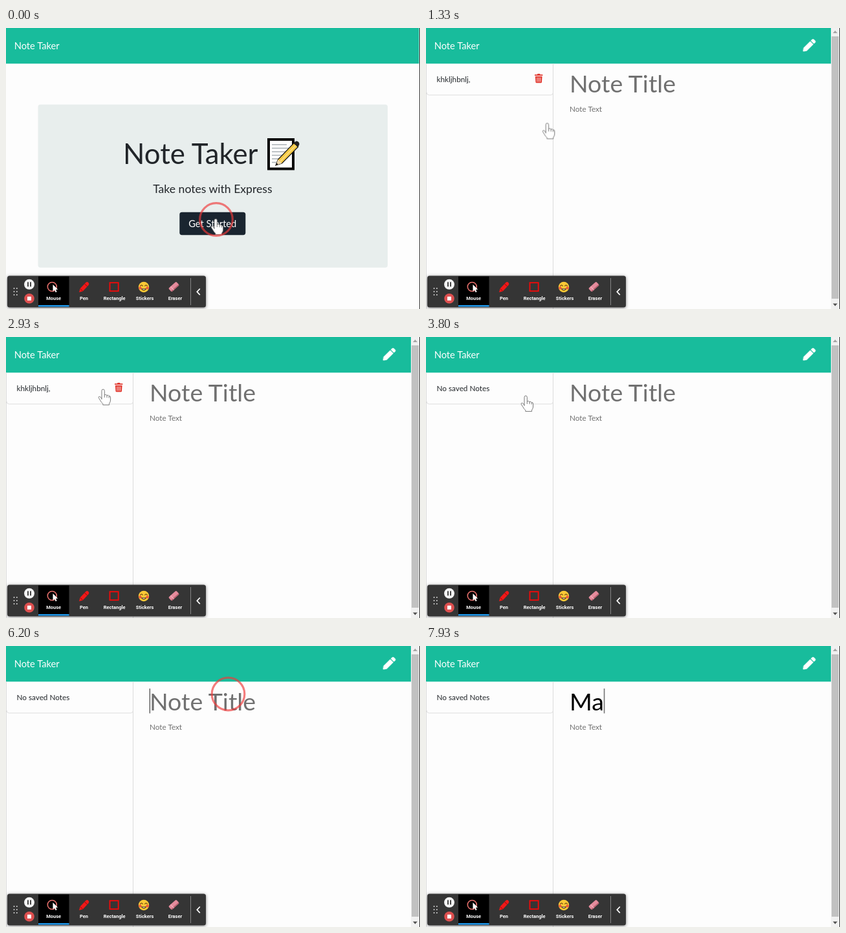
These frames come from a looping animation (640x436 px, 8 s). An HTML page:

```html
<!DOCTYPE html>
<html lang="en">
<head>
<meta charset="utf-8">
<title>Note Taker</title>
<style>
html, body { margin: 0; width: 100%; height: 100%; overflow: hidden; background: #fdfdfd; }
svg { display: block; width: 640px; height: 436px; font-family: Lato, sans-serif; }
.mid { text-anchor: middle; }
.brand, .btn { font-size: 14.7px; fill: #fff; }
.small { font-size: 11.75px; fill: #212529; }
.title { font-size: 37.6px; }
.hint { fill: #707070; }
.tool { font: 700 7.5px Roboto, sans-serif; fill: #fff; text-anchor: middle; }

/* hard switches */
.landing, .notes, .icons, .trash, .saved, .empty, .hand, .arrow, .caret, .ph, .m, .a {
  animation: 8s step-end infinite;
}
.landing { animation-name: landing; }
.notes { animation-name: notes; }
.icons { animation-name: icons; }
.trash, .saved { animation-name: saved; }
.empty { animation-name: empty; }
.hand { animation-name: hand; }
.arrow { animation-name: arrow; }
.caret { animation-name: caret; }
.ph { animation-name: ph; }
.m { animation-name: m; }
.a { animation-name: a; }
@keyframes landing { 0% { opacity: 1 } 5%, 100% { opacity: 0 } }
@keyframes notes { 0% { opacity: 0 } 5%, 100% { opacity: 1 } }
@keyframes icons { 0% { opacity: 0 } 11.6%, 100% { opacity: 1 } }
@keyframes saved { 0% { opacity: 1 } 43.2%, 100% { opacity: 0 } }
@keyframes empty { 0% { opacity: 0 } 43.2%, 100% { opacity: 1 } }
@keyframes hand {
  0% { opacity: 1 } 11.6% { opacity: 0 } 16.6% { opacity: 1 }
  50.6% { opacity: 0 } 62.4% { opacity: 1 } 74% { opacity: 0 } 100% { opacity: 0 }
}
@keyframes arrow {
  0% { opacity: 0 } 11.6% { opacity: 1 } 16.6% { opacity: 0 }
  50.6% { opacity: 1 } 62.4% { opacity: 0 } 74% { opacity: 1 } 74.9%, 100% { opacity: 0 }
}
@keyframes caret {
  0% { opacity: 0; transform: none }
  77.4% { opacity: 1; transform: none }
  84.1% { opacity: 0; transform: none }
  90.7% { opacity: 1; transform: none }
  97.4% { opacity: 0; transform: none }
  98.2% { opacity: 1; transform: translateX(34.5px) }
  99.1%, 100% { opacity: 1; transform: translateX(53.3px) }
}
@keyframes ph { 0% { opacity: 1 } 98.2%, 100% { opacity: 0 } }
@keyframes m { 0% { opacity: 0 } 98.2%, 100% { opacity: 1 } }
@keyframes a { 0% { opacity: 0 } 99.1%, 100% { opacity: 1 } }

/* pointer path */
.pointer { animation: move 8s linear infinite; }
@keyframes move {
  0%, 10.9% { transform: translate(324px, 297px) }
  18.2%, 19.4% { transform: translate(150px, 108px) }
  23.2%, 33.4% { transform: translate(102px, 88px) }
  38.2%, 46.7% { transform: translate(173px, 79px) }
  47.5%, 47.9% { transform: translate(154px, 92px) }
  48.2%, 49.4% { transform: translate(151px, 97px) }
  54.1%, 55.9% { transform: translate(370px, 46px) }
  59.9%, 61.5% { transform: translate(561px, 33px) }
  63.2%, 73.4% { transform: translate(591px, 31px) }
  75%, 100% { transform: translate(343px, 74px) }
}

/* click ripples: the same fade, started at --at */
.ring {
  fill: none; stroke: #f03a3a; stroke-width: 3.2; opacity: 0;
  animation: ring 8s linear infinite; animation-delay: calc(var(--at) - 8s);
}
@keyframes ring { 0%, .75% { opacity: .66 } 3.2%, 100% { opacity: 0 } }
</style>
</head>
<body>
<svg viewBox="0 0 640 436">
  <defs>
    <filter id="shadow" x="-10%" y="-30%" width="120%" height="160%">
      <feDropShadow dx="0" dy="1" stdDeviation="2.5" flood-opacity=".5"/>
    </filter>
    <path id="cursor" d="M0 0V17.2L4.1 13.5 6.8 19.6 9.8 18.3 7.1 12.3H12.4Z"/>
  </defs>
  <rect width="640" height="436" fill="#fdfdfd"/>
  <rect width="638.5" height="55.3" fill="#18bc9c"/>
  <text class="brand" x="12.7" y="33.2">Note Taker</text>

  <g class="landing">
    <rect x="49.5" y="118.7" width="540.5" height="253" rx="3.7" fill="#e8eeed"/>
    <text x="181" y="211" font-size="43.8" fill="#212529">Note Taker</text>
    <g>
      <path d="M406 173H444V218.5H406Z" fill="#fff" stroke="#050505" stroke-width="4"/>
      <path d="M411 181H434M411 186.5H438M411 192H436M411 197.5H430M411 203H425M411 208.5H420" stroke="#a9b0b5" stroke-width="1.5"/>
      <path d="M417 213L420.5 204 445 178.5 451.5 184.5 426.5 210Z" fill="#f6c944" stroke="#111" stroke-width="1.2"/>
      <path d="M417 213L420.5 204 426.5 210Z" fill="#efd9b0"/>
      <path d="M417 213L418.3 209.5 420.6 211.6Z"/>
      <path d="M445 178.5L447.5 176Q450 174.5 452.4 177 454.5 179.8 452.5 182.7L451.5 184.5Z" fill="#222"/>
      <path d="M424 207L448 182" stroke="#fbe08a" stroke-width="1.6"/>
    </g>
    <text class="mid" x="319.4" y="256" font-size="17.6" fill="#212529">Take notes with Express</text>
    <rect x="268.3" y="285.8" width="102" height="35.5" rx="3.7" fill="#1a2530"/>
    <text class="btn mid" x="319.3" y="308.6">Get Started</text>
  </g>

  <g class="notes">
    <path d="M.5 55.5V436M196.5 55.5V436" stroke="#dcdcdc"/>
    <path d="M1 100Q1 104 4.5 104H193Q196.5 104 196.5 100" fill="none" stroke="#dedede"/>
    <text class="small saved" x="16.5" y="84">khkljhbnlj,</text>
    <text class="small empty" x="16.5" y="84">No saved Notes</text>

    <text class="title hint ph" x="222" y="100">Note Title</text>
    <text class="title m" x="222" y="100">M</text>
    <text class="title a" x="256.3" y="100">a</text>
    <rect class="caret" x="221.8" y="66" width="1" height="38.5" fill="#222"/>
    <text class="small hint" style="fill:#707070" x="222" y="129.5">Note Text</text>

    <g class="icons">
      <path transform="translate(582.7 17) scale(.0383)" fill="#fff" d="M498 142L452 188Q443 197 435 188L324 77Q315 69 324 60L370 14Q404 -14 438 14L498 74Q526 108 498 142ZM284 100L22 362 0 484Q0 514 28 512L150 490 412 228Q421 219 412 211L301 100Q293 91 284 100Z"/>
      <g class="trash">
        <path d="M168 72.2H171.8L172.5 71H176L176.7 72.2H180.4V74H168ZM168.9 75H179.6L179 84Q178.9 85.3 177.6 85.3H170.9Q169.6 85.3 169.5 84Z" fill="#e23b32"/>
        <path d="M171.9 76.7V83.6M174.25 76.7V83.6M176.6 76.7V83.6" stroke="#fdfdfd" stroke-width=".8"/>
      </g>
    </g>

    <rect x="626" width="13" height="436" fill="#f1f1f1"/>
    <rect x="627" y="13" width="11" height="407" fill="#c1c1c1"/>
    <path d="M629 8L632.5 4 636 8Z" fill="#a3a3a3"/>
    <path d="M629 427.5L632.5 431.5 636 427.5Z" fill="#505050"/>
  </g>
  <path d="M639.5 0V436" stroke="#3a3a3a"/>

  <g>
    <rect x="2" y="384.5" width="307" height="49" rx="3.5" fill="#343434" filter="url(#shadow)"/>
    <rect x="50" y="385.5" width="47.5" height="45" fill="#000"/>
    <rect x="50" y="430" width="47.5" height="2.4" fill="#1e9bf0"/>
    <path d="M12.5 404V415M16.8 404V415" stroke="#d8d8d8" stroke-width="2" stroke-linecap="round" stroke-dasharray="0 5"/>
    <circle cx="36" cy="397.8" r="8" fill="#f3f3f3"/>
    <path d="M34 394.3V401.3M38 394.3V401.3" stroke="#333" stroke-width="1.8"/>
    <circle cx="36" cy="419.8" r="7.8" fill="#dd4f4f"/>
    <rect x="33" y="416.8" width="6" height="6" rx=".6" fill="#fff"/>

    <circle cx="71.3" cy="401.5" r="7" fill="none" stroke="#e8706c" stroke-width="1.6"/>
    <use href="#cursor" transform="translate(72.5 398) scale(.62)" fill="#fff"/>
    <path d="M113 410L114.6 404.3 123.5 394.7Q125.5 393.2 127.4 395 129.2 397 127.6 399L118.7 408.4Z" fill="#f01818"/>
    <path d="M121.5 396.8L125.6 401M114.6 404.3L118.7 408.4" stroke="#7d0909" stroke-width=".9"/>
    <rect x="160.5" y="395.2" width="13.2" height="13" fill="none" stroke="#f00a0a" stroke-width="1.9"/>
    <circle cx="213" cy="402" r="8.2" fill="#fbc936"/>
    <g fill="none" stroke="#5b3a12" stroke-width="1.1" stroke-linecap="round">
      <path d="M207.7 400.2Q209.6 397.8 211.3 400.2M214.7 400.2Q216.4 397.8 218.3 400.2"/>
      <path d="M209.6 404.8Q213 409 216.4 404.8Z" fill="#fff"/>
    </g>
    <circle cx="207.4" cy="403.4" r="2.1" fill="#f0563f"/>
    <circle cx="218.6" cy="403.4" r="2.1" fill="#f0563f"/>
    <g transform="rotate(-42 259.5 401.5)">
      <rect x="251.5" y="397.7" width="16" height="7.6" rx="1.6" fill="#e58b9c"/>
      <path d="M252 404.3H267" stroke="#b9606f" stroke-width="1.6"/>
      <path d="M256 397.7V405.3" stroke="#f4b9c3"/>
    </g>
    <text class="tool" x="73.6" y="421.8">Mouse</text>
    <text class="tool" x="120.5" y="421.8">Pen</text>
    <text class="tool" x="167.6" y="421.8">Rectangle</text>
    <text class="tool" x="214.6" y="421.8">Stickers</text>
    <text class="tool" x="261.5" y="421.8">Eraser</text>
    <path d="M285.5 388V430" stroke="#858585"/>
    <path d="M299.8 404.5L295.3 409.3 299.8 414.1" fill="none" stroke="#fff" stroke-width="1.7"/>
  </g>

  <g class="pointer">
    <g class="hand" fill="#fff" stroke="#777" stroke-width="1" stroke-linejoin="round">
      <path d="M-2 14.5V1.6Q-2 -.8 .2 -.8 2.3 -.8 2.3 1.6V8Q4.6 6.4 6 8.6 8.2 7.4 9.2 9.6 11.6 9 11.6 12V16Q11.6 19 9.6 21.2V23.4H-.2V21.6Q-2.6 19.6 -4 16.8L-6.6 12.6Q-7.4 10.8 -5.8 10.4 -4.4 10.2 -3.2 12Z"/>
      <path d="M2.3 8V12M6 8.6V12.2M9.2 9.6V12.6" fill="none"/>
    </g>
    <use class="arrow" href="#cursor" fill="#fff" stroke="#222" stroke-width="1"/>
  </g>
  <circle class="ring" cx="325" cy="297" r="25.3" style="--at:0s"/>
  <circle class="ring" cx="103.5" cy="87" r="25.3" style="--at:1.99s"/>
  <circle class="ring" cx="174" cy="79" r="25.3" style="--at:3.19s"/>
  <circle class="ring" cx="592" cy="31" r="25.3" style="--at:5.25s"/>
  <circle class="ring" cx="343.5" cy="74.5" r="25.3" style="--at:6.19s"/>
</svg>
</body>
</html>
```
